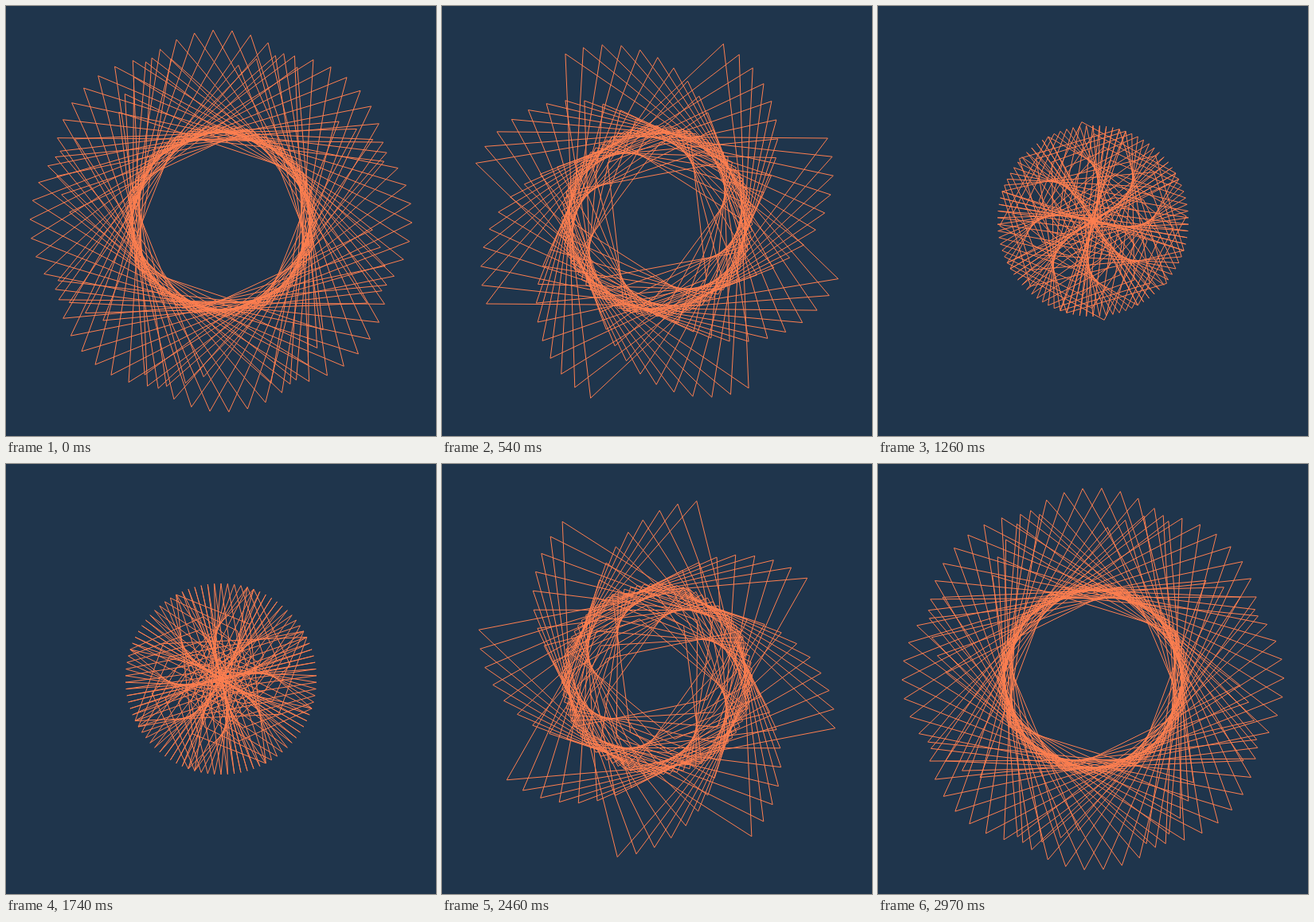
These frames come from a looping animation (540x540 px, 3000 ms). An HTML page with a canvas:

```html
<!DOCTYPE html>
<html>
<head>
<meta charset="utf-8">
<title>Rhombus spirograph</title>
<style>
html, body { margin: 0; width: 100%; height: 100%; overflow: hidden; background: #1f354c; }
canvas { display: block; width: 540px; height: 540px; }
</style>
</head>
<body>
<canvas id="stage" width="540" height="540"></canvas>
<script>
const ctx = document.getElementById('stage').getContext('2d');
const SIZE = 540, LOOP = 3000, STEPS = 100;
const COUNT = 51, RADIUS = 120, SWAY = 50;
const FIRST_ANGLE = 60, ANGLE_STEP = -44;
const FIRST_PHASE = -58.7, PHASE_STEP = 2.035;
const rad = deg => deg * Math.PI / 180;

// One rhombus: two tips follow an ellipse through the centre, two corners stay put.
function rhombus(angle, phase) {
  const c = Math.cos(angle), s = Math.sin(angle);
  const along = RADIUS * (1 + Math.cos(phase));
  const across = SWAY * Math.sin(phase);
  const x = along * c - across * s, y = along * s + across * c;
  const qx = -RADIUS * s, qy = RADIUS * c;
  ctx.beginPath();
  ctx.moveTo(x, y);
  ctx.lineTo(qx, qy);
  ctx.lineTo(-x, -y);
  ctx.lineTo(-qx, -qy);
  ctx.closePath();
  ctx.stroke();
}

function draw(ms) {
  const step = Math.floor((ms % LOOP) / LOOP * STEPS);
  const turn = FIRST_PHASE + step * 360 / STEPS;
  ctx.setTransform(1, 0, 0, 1, 0, 0);
  ctx.fillStyle = '#1f354c';
  ctx.fillRect(0, 0, SIZE, SIZE);
  ctx.translate(SIZE / 2, SIZE / 2);
  ctx.strokeStyle = '#ff7f50';
  ctx.lineWidth = 1;
  ctx.lineJoin = 'miter';
  for (let i = 0; i < COUNT; i++) {
    rhombus(rad(FIRST_ANGLE + ANGLE_STEP * i), rad(turn + PHASE_STEP * i));
  }
}

let start = null;
function tick(now) {
  if (start === null) start = now;
  draw(Math.max(0, now - start));
  requestAnimationFrame(tick);
}
draw(0);
requestAnimationFrame(tick);
</script>
</body>
</html>
```
